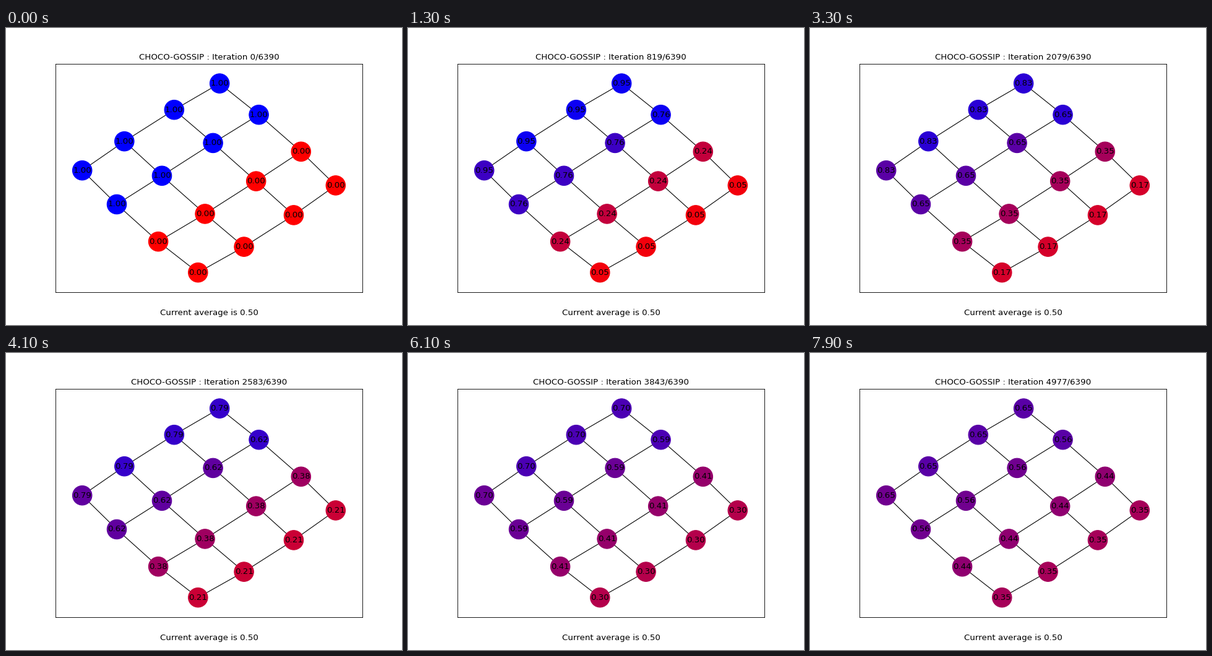
Write a matplotlib script that moves like this. It is 640 px wide and 480 px high and loops after 8000 ms.

```python
import numpy as np
import matplotlib.pyplot as plt
from matplotlib.animation import FuncAnimation
from matplotlib.colors import LinearSegmentedColormap

FRAMES, INTERVAL = 80, 100
STEP, TOTAL = 63, 6390      # iterations per frame, iterations in all
RATE = 4.806e-4             # consensus step size
N = 4

# Grid nodes in stage pixels, one row per consensus level.
POS = np.array([
    (345.2, 89.6), (271.8, 132.2), (191.3, 183.2), (123.2, 230.2),
    (408.6, 140.2), (334.6, 185.9), (252.0, 238.8), (179.0, 285.0),
    (476.8, 199.8), (404.2, 247.6), (321.6, 300.4), (246.1, 345.2),
    (532.8, 254.4), (465.0, 302.4), (384.6, 353.6), (310.3, 395.2),
])
EDGES = [(i, i + 1) for i in range(N * N) if i % N < N - 1]
EDGES += [(i, i + N) for i in range(N * N - N)]

# Colours are listed in another node order than the labels.
COLOR_ORDER = np.arange(N * N)
COLOR_ORDER[[3, 4]] = 4, 3

# Averaging along a chain of N levels, solved through the graph Laplacian.
LAPLACIAN = np.diag([1, 2, 2, 1]) - np.eye(N, k=1) - np.eye(N, k=-1)
EIGVALS, EIGVECS = np.linalg.eigh(LAPLACIAN)
START = np.array([1, 1, 0, 0])


def node_values(iteration):
    decay = np.exp(-RATE * EIGVALS * iteration)
    levels = EIGVECS @ (decay * (EIGVECS.T @ START))
    return np.clip(np.repeat(levels, N), 0, 1)


fig, ax = plt.subplots(figsize=(8, 6), dpi=80)
fig.subplots_adjust(left=0.125, right=0.9, bottom=0.11, top=0.88)
ax.set(xlim=(80, 576), ylim=(427.2, 57.6), xticks=[], yticks=[])

for a, b in EDGES:
    ax.plot(*POS[[a, b]].T, color="black", lw=1, zorder=1)

cmap = LinearSegmentedColormap.from_list("red_blue", ["red", "blue"])
nodes = ax.scatter(*POS.T, s=800, c=node_values(0), cmap=cmap,
                   vmin=0, vmax=1, linewidths=1, zorder=2)
labels = [ax.text(x, y, "", size=12, ha="center", va="center", zorder=3)
          for x, y in POS]
title = ax.set_title("", fontsize=12, pad=6)
average = ax.text(0.5, -0.1, "", size=12, ha="center", transform=ax.transAxes)


def update(frame):
    iteration = frame * STEP
    values = node_values(iteration)
    nodes.set_array(values[COLOR_ORDER])
    for label, value in zip(labels, values):
        label.set_text(f"{value:.2f}")
    title.set_text(f"CHOCO-GOSSIP : Iteration {iteration}/{TOTAL}")
    average.set_text(f"Current average is {values.mean():.2f}")
    return [nodes, title, average, *labels]


anim = FuncAnimation(fig, update, frames=FRAMES, interval=INTERVAL,
                     init_func=lambda: update(0), repeat=True, repeat_delay=0)
plt.show()
```
